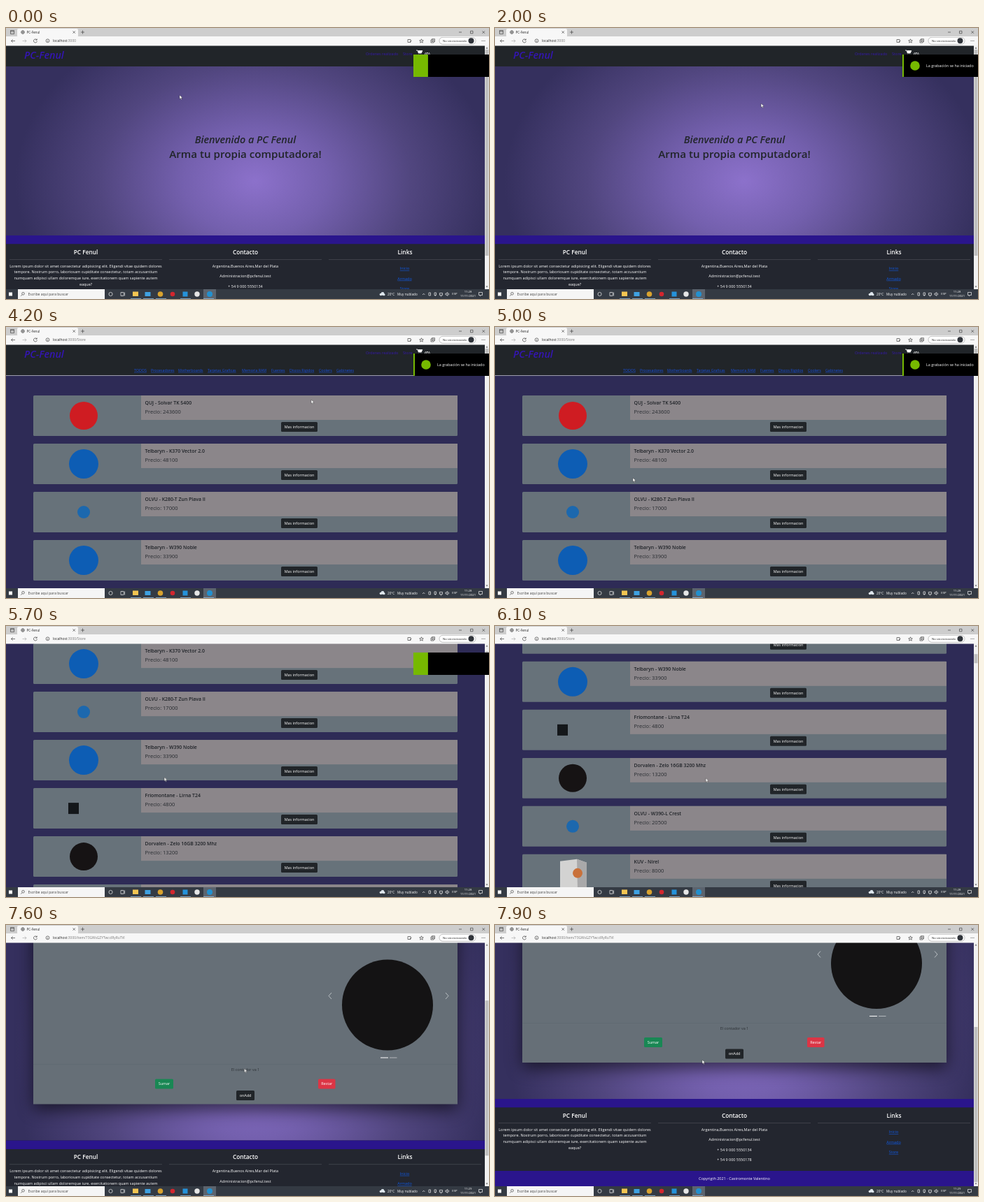
An HTML page for the animation above (8000 ms loop, 690x388 px).

```html
<!DOCTYPE html>
<html lang="es">
<head>
<meta charset="utf-8">
<title>PC-Fenul</title>
<style>
html, body { margin: 0; width: 100%; height: 100%; overflow: hidden; background: #212529; }
svg { display: block; width: 690px; height: 388px; font-family: "Open Sans", "Noto Sans", sans-serif; }
text { white-space: pre; }
.m { text-anchor: middle; }
.b { font-weight: 600; }
.i { font-style: italic; }
.u { text-decoration: underline; }
.line { fill: none; stroke: #444; stroke-width: .7; }

.anim { animation: 8s linear infinite; }
.cut { animation: 8s step-end infinite; }
.home { animation-name: home; }
.store { animation-name: store; }
.item { animation-name: item; }
.notItem { animation-name: notItem; }
.urlHome { animation-name: urlHome; }
.urlStore { animation-name: urlStore; }
.linkHover { animation-name: linkHover; }
.arrow { animation-name: arrow; }
.cardHover { animation-name: cardHover; }
.storeScroll { animation-name: storeScroll; }
.itemScroll { animation-name: itemScroll; }
.pointer { animation-name: pointer; }
.green { animation-name: green; }
.black { animation-name: black; }
.notice { animation-name: notice; }

@keyframes home { 0%, 100% { visibility: visible } 45% { visibility: hidden } }
@keyframes store { 0%, 88.75%, 100% { visibility: hidden } 45% { visibility: visible } }
@keyframes item { 0% { visibility: hidden } 88.75%, 100% { visibility: visible } }
@keyframes notItem { 0% { visibility: visible } 88.75%, 100% { visibility: hidden } }
@keyframes urlHome { 0% { visibility: visible } 42.5%, 100% { visibility: hidden } }
@keyframes urlStore { 0%, 88.75%, 100% { visibility: hidden } 42.5% { visibility: visible } }
@keyframes linkHover { 0%, 45%, 100% { opacity: 0 } 41.25% { opacity: 1 } }
@keyframes arrow { 0%, 45%, 100% { opacity: 1 } 41.25% { opacity: 0 } }
@keyframes cardHover { 0%, 77.5% { opacity: 0 } 80%, 100% { opacity: .55 } }
@keyframes storeScroll {
  0%, 66.25% { transform: translateY(0) }
  71.25% { transform: translateY(calc(var(--d) * .541)); animation-timing-function: ease-out }
  77.5%, 100% { transform: translateY(var(--d)) }
}
@keyframes itemScroll {
  0%, 91.25% { transform: translateY(0); animation-timing-function: ease-in-out }
  97.5%, 100% { transform: translateY(var(--d)) }
}
@keyframes pointer {
  0% { transform: translate(248px, 96px); animation-timing-function: ease-in-out }
  25% { transform: translate(380px, 108px) }
  34% { transform: translate(440px, 98px); animation-timing-function: ease-in-out }
  41.25%, 47% { transform: translate(577px, 38px); animation-timing-function: ease-in-out }
  60%, 66% { transform: translate(197px, 216px); animation-timing-function: ease-in-out }
  85% { transform: translate(380px, 219px) }
  87.5%, 90% { transform: translate(414px, 226px); animation-timing-function: ease-in-out }
  98.75%, 100% { transform: translate(296px, 193px) }
}
@keyframes green { 0%, 73.75% { transform: none } 76.25%, 100% { transform: translateX(108px) } }
@keyframes black {
  0% { transform: translateX(21px) }
  2.5%, 70% { transform: translateX(2px) }
  71.25% { transform: translateX(20px) }
  72.5%, 100% { transform: translateX(108px) }
}
@keyframes notice { 0%, 2.5%, 70%, 100% { opacity: 0 } 6.25%, 68.75% { opacity: 1 } }
</style>
</head>
<body>
<svg id="stage" viewBox="0 0 690 388"></svg>
<script>
const DARK = '#212529', INDIGO = '#2a158c', LINK = '#105ae6', NAV = '#3519ab', SLATE = '#67727a';

const text = (x, y, size, str, fill, cls = '') =>
  `<text x="${x}" y="${y + size * .33}" font-size="${size}" fill="${fill}" class="${cls}">${str}</text>`;
const rect = (x, y, w, h, fill, extra = '') =>
  `<rect x="${x}" y="${y}" width="${w}" height="${h}" fill="${fill}" ${extra}/>`;
const dot = (x, y, r, fill) => `<circle cx="${x}" cy="${y}" r="${r}" fill="${fill}"/>`;
const path = (d, extra = '') => `<path class="line" d="${d}" ${extra}/>`;
const group = (cls, body, extra = '') => `<g class="${cls}" ${extra}>${body}</g>`;
const column = (x, y, step, size, rows, fill, cls) =>
  rows.map((row, i) => text(x, y + i * step, size, row, fill, cls)).join('');
const button = (x, y, w, label, fill) =>
  rect(x, y, w, 14, fill, 'rx="1.6"') + text(x + w / 2, y + 7, 5.45, label, '#fff', 'm');

const defs = `<defs>
  <radialGradient id="glow" cx=".52" cy=".68" r=".5" gradientTransform="translate(.52 .68) scale(1 2.1) translate(-.52 -.68)">
    <stop offset="0" stop-color="#8c71cb"/><stop offset=".3" stop-color="#7460ae"/>
    <stop offset=".65" stop-color="#51467f"/><stop offset="1" stop-color="#35305e"/>
  </radialGradient>
  <filter id="soft" x="-10%" y="-40%" width="120%" height="180%"><feGaussianBlur stdDeviation="4"/></filter>
  <filter id="wide" x="-10%" y="-20%" width="120%" height="140%"><feGaussianBlur stdDeviation="12"/></filter>
  <clipPath id="view"><path d="M0 25H690V374H0Z"/></clipPath>
  <clipPath id="toast"><path d="M582 38H690V70H582Z"/></clipPath>
</defs>`;

const backdrop = (y, h) => rect(0, y, 684, h, 'url(#glow)');

const header = h => rect(0, 25, 684, h, DARK) +
  text(26, 39.5, 14.3, 'PC-Fenul', '#3415b4', 'b i') +
  text(514, 37.5, 5.45, 'Ordenes realizado', NAV) +
  text(567, 37.5, 5.6, 'Store', NAV) +
  '<path d="M586 32h2l1.300 4h4l1.500-3.500h-6" fill="#fff" stroke="#fff" stroke-width=".8"/>' +
  dot(589.5, 38.6, .9, '#fff') + dot(593, 38.6, .9, '#fff') +
  text(598, 37.5, 6.4, '(0)', '#fff', 'b');

const footer = y => rect(0, y, 684, 12.5, INDIGO) + rect(0, y + 12.5, 684, 90.5, '#23262f') +
  ['PC Fenul', 'Contacto', 'Links'].map((title, i) =>
    text(114 + i * 228, y + 24, 8.3, title, '#fff', 'm b') +
    rect(5 + i * 228, y + 34, 218, .6, '#50535b')).join('') +
  column(114, y + 44, 8.65, 5.48, [
    'Lorem ipsum dolor sit amet consectetur adipisicing elit. Eligendi vitae quidem dolores',
    'tempore. Nostrum porro, laboriosam cupiditate consectetur, totam accusantium',
    'numquam adipisci ullam doloremque iure, exercitationem quam sapiente autem',
    'eaque?'], '#fff', 'm') +
  column(342, y + 44, 14.4, 5.48, ['Argentina,Buenos Aires,Mar del Plata',
    'Administracion@pcfenul.test', '+ 54 9 000 5550134', '+ 54 9 000 5550178'], '#fff', 'm') +
  column(569.5, y + 47.5, 14.3, 5.45, ['Inicio', 'Armado', 'Store'], LINK, 'm u') +
  rect(0, y + 103, 684, 22, INDIGO) +
  text(342, y + 114, 5.48, 'Copyrigth 2021 - Castromonte Valentino', '#fff', 'm');

const scrollbar = (size, anim = '', travel = 0) => rect(684, 25, 6, 349, '#f0f0f0') +
  '<path d="M685.500 29.500l1.500-2 1.500 2zM685.500 369.500l1.500 2 1.500-2z" fill="#666"/>' +
  group(anim, rect(684.6, 31, 4.8, size, '#bfbfbf'), `style="--d:${travel}px"`);

const home = header(30) + backdrop(55, 242) +
  text(342, 160.5, 14.4, 'Bienvenido a PC Fenul', DARK, 'm b i') +
  text(342, 181.5, 15.15, 'Arma tu propia computadora!', DARK, 'm b') +
  footer(297) + scrollbar(295);

const marks = {
  red: y => dot(111, y, 20, '#cf1c22'),
  blue: y => dot(111, y, 21, '#0d5db4'),
  sky: y => dot(111, y, 9, '#1c68ae'),
  square: y => rect(89, y - 8, 15, 16, '#14171a'),
  black: y => dot(111, y, 20, '#161314'),
  box: y => `<path d="M93 ${y - 19}l24-3 14 5v35l-13 5-25-4z" fill="#d3d3d2"/>` +
    `<path d="M117 ${y - 22}l14 5v35l-13 5z" fill="#a9a9aa"/>` + dot(118, y - 2, 7, '#c9713a')
};

const products = [
  ['QUJ - Solvar TK 5400', 243600, 'red'],
  ['Telbaryn - K370 Vector 2.0', 48100, 'blue'],
  ['OLVU - K280-T Zun Plava II', 17000, 'sky'],
  ['Telbaryn - W390 Noble', 33900, 'blue'],
  ['Friomontane - Lirna T24', 4800, 'square'],
  ['Dorvalen - Zelo 16GB 3200 Mhz', 13200, 'black'],
  ['OLVU - W390-L Crest', 20500, 'sky'],
  ['KUV - Nirel', 8000, 'box']
];

const card = ([name, price, mark], i) => {
  const y = 98 + 69 * i;
  const shadow = i === 5 ? rect(39, y + 3, 606, 58, '#000', 'filter="url(#soft)" class="anim cardHover"') : '';
  return shadow + rect(39, y, 606, 58, SLATE, 'rx="1.500"') + rect(193, y, 452, 35, '#8b868a') +
    marks[mark](y + 29) +
    text(198.5, y + 10.5, 6.9, name, '#1e2227', 'b') +
    text(198.5, y + 23.5, 7.5, `Precio: ${price}`, '#272b30') +
    button(393, y + 38, 52, 'Mas informacion', DARK);
};

const menu = [[183, 'TODOS'], [207, 'Procesadores'], [246, 'Motherboards'], [288, 'Tarjetas Graficas'],
  [337, 'Memoria RAM'], [379, 'Fuentes'], [405, 'Discos Rigidos'], [447, 'Coolers'], [472, 'Gabinetes']];

const store = rect(0, 25, 684, 349, '#2e2b56') +
  group('anim storeScroll', header(44) +
    menu.map(([x, label]) => text(x, 62, 5.3, label, '#1850de', 'u')).join('') +
    rect(0, 69, 684, .8, '#b9bac4') + products.map(card).join(''), 'style="--d:-261.5px"') +
  scrollbar(13, 'anim storeScroll', 9.5);

const chevron = (x, dir) => path(`M${x + 2 * dir} 218.500l${-4 * dir} 4.500 ${4 * dir} 4.500`, 'style="stroke:#dfe2e4"');
const item = group('anim itemScroll', backdrop(25, 405) + header(30) +
  rect(39, 106, 606, 280, '#000', 'filter="url(#wide)" opacity=".6"') +
  rect(39, 98, 606, 280, '#666f77') +
  dot(545, 236, 65, '#141314') + chevron(463, 1) + chevron(630, -1) +
  rect(535, 311, 11, 1, '#fff') + rect(548, 311, 10.5, 1, '#b4b9bd') +
  rect(39, 321, 606, .5, '#5b646c') +
  text(342, 329, 5.45, 'El contador va 1', '#2b3035', 'm') +
  button(213, 342, 26, 'Sumar', '#198754') + button(446, 342, 24.5, 'Restar', '#dc3545') +
  button(329, 358.5, 26, 'onAdd', DARK) + footer(430), 'style="--d:-181px"') +
  scrollbar(222, 'anim itemScroll', 115);

const url = (cls, rest) => group(`cut ${cls}`,
  `<text x="67" y="20.200" font-size="4.900" fill="#222">localhost<tspan fill="#777">:3000${rest}</tspan></text>`);

const browser = rect(0, 0, 690, 12, '#cdcdcd') + rect(16, 1, 87, 12, '#f7f7f7', 'rx="2"') +
  rect(0, 12, 690, 13.5, '#f7f7f7') +
  path('M6.500 3.500h5v5h-5zM6.500 5h5') +
  '<circle cx="24" cy="6" r="2.300" class="line"/>' + path('M21.700 6h4.600M24 3.700v4.600') +
  text(29.5, 6, 4.6, 'PC-Fenul', '#222') +
  path('M95.500 4.300l3.400 3.400m0-3.400l-3.400 3.400M107 6h5m-2.500-2.500v5') +
  path('M647 6h4M663.500 4.300h3.500v3.500h-3.500zM680.500 4.300l3.500 3.500m0-3.500l-3.500 3.500') +
  path('M13 18.500H7.500m2.200-2.200l-2.200 2.200 2.200 2.200') +
  path('M23.500 18.500H29m-2.200-2.200l2.200 2.200-2.200 2.200', 'opacity=".4"') +
  path('M44 17a2.500 2.500 0 1 0 .4 2M44.200 15.500v1.800h-1.800') +
  '<circle cx="59.500" cy="18.300" r="2.400" class="line"/>' + path('M59.500 18v1.700M59.500 16.800v.4') +
  url('urlHome', '') + url('urlStore', '/Store') + url('item', '/item/73GWsGZYTwcclRyRuTVI') +
  path('M574 16.500h4v4h-4zM577 20l2.500-2') + path('M593.500 15.800l.8 1.900 2 .1-1.500 1.300.5 2-1.800-1.100-1.800 1.100.5-2-1.500-1.300 2-.1z') +
  path('M607 17h4v4h-4zM608.500 17v-1.300h4v4h-1.400M609 18v2m-1-1h2') +
  rect(619, 13.3, 52, 10, '#fff', 'rx="5" stroke="#888" stroke-width=".5"') +
  text(624, 18.3, 4.2, 'No sincronizando', '#222') + dot(664.5, 18.3, 4, '#30343a') +
  [680, 682, 684].map(x => dot(x, 18.3, .55, '#444')).join('');

const light = 'style="stroke:#f2f2f2"';
const clock = (cls, time) => group(`cut ${cls}`, text(660, 377.8, 4.2, time, '#fff', 'm'));
const taskbar = rect(0, 374, 690, 14, '#343a43') + rect(4, 378.5, 5, 5, '#fff') +
  rect(17, 374, 124, 14, '#f5f5f5') + '<circle cx="24.500" cy="380.300" r="1.800" class="line"/>' + path('M23.200 381.700l-2 2') +
  text(31.5, 381, 5.05, 'Escribe aquí para buscar', '#444') +
  rect(282, 374, 18, 14, '#5c646e') +
  `<circle cx="149.500" cy="381" r="2.600" class="line" ${light}/>` + path('M164 378.500h4v5h-4zM169.500 378.500v5', light) +
  rect(181, 377.5, 8, 6.5, '#f3c552') + rect(198.5, 378, 8, 6, '#3fa2e2') +
  dot(220.5, 381, 3.8, '#d9a32f') + dot(238, 381, 3.3, '#d3262e') +
  rect(252.5, 377.5, 7, 7, '#2592da') + dot(273, 381, 3.7, '#e6e6e6') + dot(291, 381, 4, '#2290cf') +
  [178, 196, 214, 249, 282].map(x => rect(x, 387.2, 15, .8, '#8bb7dd')).join('') +
  dot(535.5, 381.5, 1.8, '#dfe7ee') + dot(538, 380.5, 2.4, '#dfe7ee') + dot(540, 381.8, 1.5, '#dfe7ee') +
  text(545, 381, 4.7, '20°C', '#fff') + text(559, 381, 4.7, 'Muy nublado', '#fff') +
  path('M595 382l1.700-1.700 1.700 1.700M604 379h2.500v4h-2.500zM612 379h2.500v3.500h-2.500zM613.200 382.500v1.500M619.500 379.500h4v3h-4zM620.500 384h2M628 380h1.200l1.500-1.500v5l-1.500-1.500h-1.200zM632 379.500q1.500 1.500 0 3', light) +
  text(641, 381, 4.3, 'ESP', '#fff', 'm') +
  clock('notItem', '11:28') + clock('item', '11:29') +
  text(660, 384, 4.2, '11/11/2021', '#fff', 'm') + path('M675.500 378.500h5v4h-2l-1.200 1.500v-1.500h-1.800z', light);

const toast = group('', group('anim green', rect(582, 38, 108, 32, '#76b900')) +
  group('anim black', rect(582, 38, 110, 32, '#000')) +
  group('anim notice', dot(600, 54, 6.8, '#76b900') + text(616, 54.3, 5.4, 'La grabación se ha iniciado', '#fff')),
  'clip-path="url(#toast)"');

const pointer = group('anim pointer',
  '<path class="cut arrow" d="M0 0v5.600l1.300-1.200 1 2 .9-.4-.9-2h1.800z" fill="#fff" stroke="#222" stroke-width=".35"/>' +
  '<path class="cut linkHover" d="M0 0q.6-.5 1.100 0v2.500l2.800.8q.4 2.400-.8 4.200h-2.600l-2-3.400q.6-.5 1.500.4z" fill="#fff" stroke="#222" stroke-width=".35"/>');

document.getElementById('stage').innerHTML = defs +
  group('', group('cut home', home + group('cut linkHover', text(567, 37.5, 5.6, 'Store', '#1b66e8'))) +
    group('cut store', store) + group('cut item', item), 'clip-path="url(#view)"') +
  browser + taskbar + toast + pointer;
</script>
</body>
</html>
```
